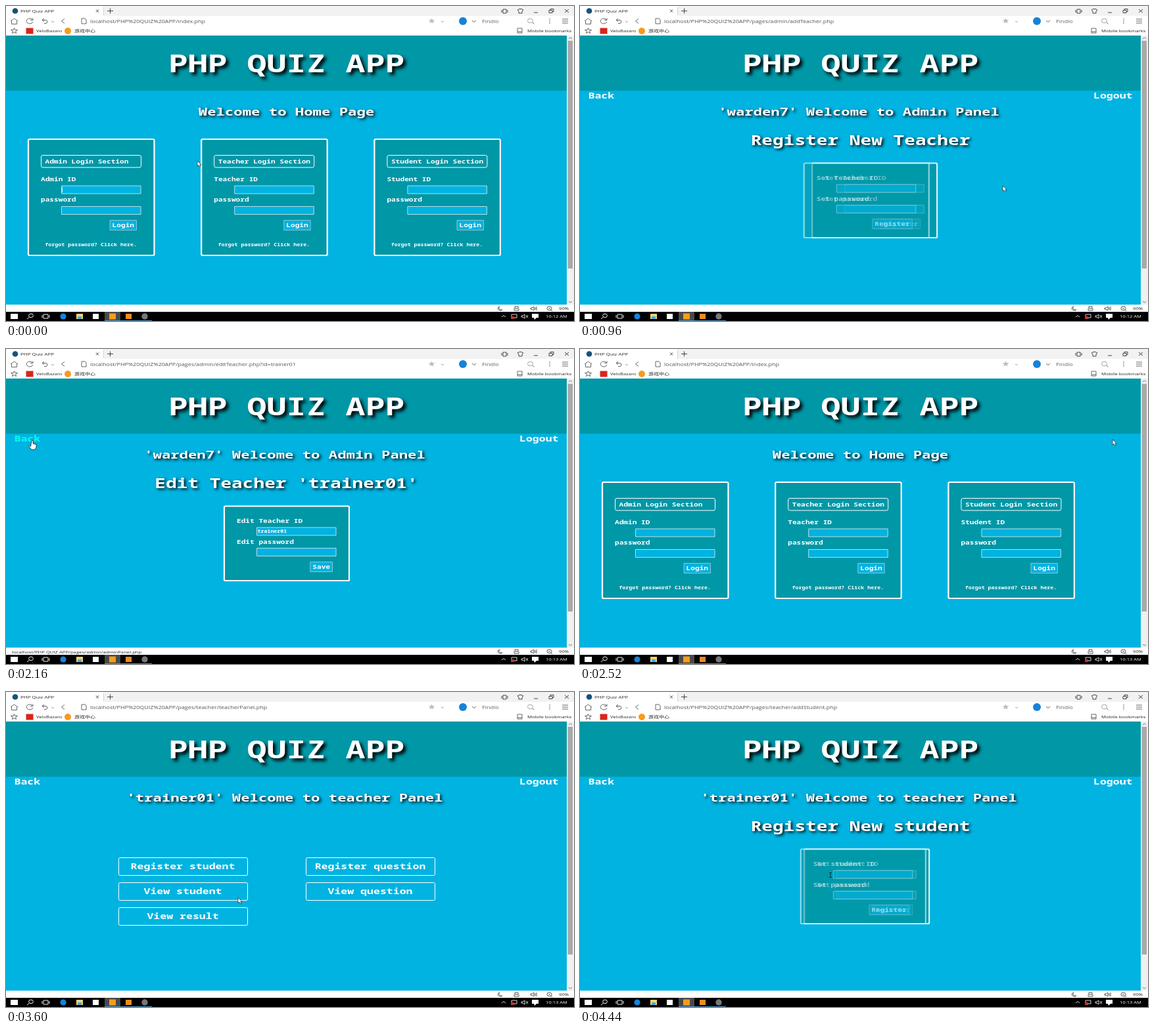
Recreate the animation shown at these times as an HTML page with a canvas. Size 864x480 px, loop 4560 ms.

```html
<!DOCTYPE html>
<html lang="en">
<head>
<meta charset="utf-8">
<title>PHP Quiz APP</title>
<style>
html, body { margin: 0; width: 100%; height: 100%; overflow: hidden; }
canvas { display: block; }
</style>
</head>
<body>
<canvas id="stage" width="864" height="480"></canvas>
<script>
const ctx = document.getElementById('stage').getContext('2d');
const LOOP = 4560, STEP = 120;
const WIDE = 1.35; // a 4:3 desktop shown on a 16:9 stage
const MONO = "'Noto Sans Mono', 'DejaVu Sans Mono', monospace";
const SANS = "'Open Sans', 'Noto Sans CJK SC', 'Noto Sans CJK', sans-serif";
const BLUE = '#00b3e1', TEAL = '#0097a7', INK = '#333', EDGE = '#b9dde4';
const ADMIN = 'warden7', TUTOR = 'trainer0', PUPIL = 'learner02';
let t = 0;

function text(s, x, y, size, { color = '#fff', weight = 'bold', align = 'left', font = MONO } = {}) {
  ctx.save();
  ctx.translate(x, y);
  ctx.scale(WIDE, 1);
  ctx.font = `${weight} ${size}px ${font}`;
  ctx.textAlign = align;
  ctx.fillStyle = color;
  ctx.fillText(s, 0, 0);
  ctx.restore();
}

const label = (s, x, y, size, color = '#222') =>
  text(s, x, y, size, { color, weight: 'normal', font: SANS });

function heading(s, y, size, x = 426.5) {
  ctx.save();
  ctx.shadowColor = '#000';
  ctx.shadowBlur = size > 30 ? 5 : 4;
  ctx.shadowOffsetX = ctx.shadowOffsetY = size > 30 ? 4 : 2.3;
  text(s, x, y, size, { align: 'center' });
  ctx.restore();
}

function rect(x, y, w, h, color) {
  ctx.fillStyle = color;
  ctx.fillRect(x, y, w, h);
}

function frame(x, y, w, h, { fill, line = '#fff', width = 1, radius = 0 } = {}) {
  ctx.beginPath();
  ctx.roundRect(x, y, w, h, radius);
  if (fill) { ctx.fillStyle = fill; ctx.fill(); }
  ctx.strokeStyle = line;
  ctx.lineWidth = width;
  ctx.stroke();
}

function disc(x, y, r, color) {
  ctx.beginPath();
  ctx.arc(x, y, r, 0, 7);
  ctx.fillStyle = color;
  ctx.fill();
}

function stroke(d, color = INK, width = .9) {
  ctx.strokeStyle = color;
  ctx.lineWidth = width;
  ctx.stroke(new Path2D(d));
}

const typed = (s, start) => s.slice(0, Math.max(0, Math.floor((t - start) / 40)));

function input(x, y, value = '') {
  frame(x + .5, y + .5, 120.5, 12, { fill: BLUE, line: EDGE });
  text(value, x + 1.5, y + 8.7, 6.15);
}

function button(s, right, y) {
  const w = s.length * 6.68 + 8;
  frame(right - w + .5, y + .5, w - 1, 15, { fill: BLUE, line: '#8fc4d0' });
  text(s, right - w / 2, y + 11, 8.25, { align: 'center' });
}

// Pages

function home() {
  heading('Welcome to Home Page', 166.5, 16.5);
  const first = t < 480;
  ['Admin', 'Teacher', 'Student'].forEach((role, i) => {
    const x = 33 + i * 263.2;
    const id = i === 0 && first ? typed(ADMIN, 0) : i === 1 && !first ? typed(TUTOR + 1, 2840) : '';
    const pass = i === 0 && first ? typed('••••••', 240) : i === 1 && !first ? typed('••••••', 3200) : '';
    frame(x + 1, 203, 191.5, 177, { fill: TEAL, width: 2.2, radius: 2 });
    frame(x + 20.5, 227.5, 152, 18.5, { radius: 2.5 });
    text(role + ' Login Section', x + 26.5, 239.7, 8.25);
    text(role + ' ID', x + 20, 267, 8.25);
    input(x + 51, 273.5, id);
    text('password', x + 20, 298.3, 8.25);
    input(x + 51, 305, pass);
    button('Login', x + 166 + (i ? 1.5 : 0), 326);
    text('forgot password? Click here.', x + 26.3, 365.5, 6.17);
  });
  if (!t) rect(85, 276, .8, 8, '#fff');
}

function panel(title, backHover) {
  text('Back', 12.5, 141.3, 12.25, { color: backHover ? '#00fff0' : '#fff' });
  text('Logout', 781, 141.3, 12.25);
  heading(title, 166.5, 16.5, 424);
}
const adminArea = hover => panel(`'${ADMIN}' Welcome to Admin Panel`, hover);
const tutorArea = () => panel(`'${TUTOR}1' Welcome to teacher Panel`);

function menu(items, columns) {
  items.forEach((s, i) => {
    const x = columns[i % columns.length], y = 252 + 38 * Math.floor(i / columns.length);
    frame(x + .5, y + .5, 196, 27, { radius: 2 });
    text(s, x + 98, y + 18, 12.25, { align: 'center' });
  });
}

function formAt(x, verb, role, action, id, pass) {
  frame(x + 1, 239.5, 190, 113.5, { fill: TEAL, width: 2.2, radius: 1.5 });
  text(`${verb} ${role} ID`, x + 20, 265.2, 8.25);
  input(x + 50, 271.5, id);
  text(verb + ' password', x + 20, 296.8, 8.25);
  input(x + 50, 303, pass);
  button(action, x + 166, 324);
}

// The form glides in from the right and leaves a blurred trace
function form(age, ...content) {
  const shift = 480 * Math.exp(-age / 30);
  const layers = shift > .5 ? [[shift * 2.4, .85], [shift, .55]] : [[0, 1]];
  for (const [dx, alpha] of layers) {
    ctx.globalAlpha = alpha;
    formAt(331 + dx, ...content);
  }
  ctx.globalAlpha = 1;
}

function table(head, ids) {
  frame(123.3, 194.3, 611, 174.2, { width: 2.4 });
  [head, 'Password', 'Actions'].forEach((title, col) => {
    const x = 128.4 + 202.2 * col, mid = x + 98;
    frame(x, 197.5, 196, 42, { width: 1.6 });
    text(title, mid, 224, 16.5, { align: 'center' });
    ids.forEach((id, row) => {
      const y = 240.3 + 20.5 * row, base = y + 12.6;
      frame(x, y, 196, 20.3, { width: 1.6 });
      if (col < 2) text(col ? 'password' : id, mid, base, 8.25, { weight: 'normal', align: 'center' });
      else {
        text('Edit', 594.5, base, 8.25);
        text('Delete', 645.5, base, 8.25);
      }
    });
  });
}

const adminPanel = {
  url: 'pages/admin/adminPanel.php',
  draw() { adminArea(); menu(['Register Teacher', 'View Teacher'], [310]); }
};
const tutorPanel = {
  url: 'pages/teacher/teacherPanel.php',
  draw() {
    tutorArea();
    menu(['Register student', 'Register question', 'View student', 'View question', 'View result'], [171, 456]);
  }
};
const homePage = { url: 'index.php', draw: home };
const backHover = () => t >= 2160;

const timeline = [
  [0, homePage],
  [480, adminPanel],
  [840, {
    url: 'pages/admin/addTeacher.php',
    draw(age) {
      adminArea();
      heading('Register New Teacher', 212, 20.6);
      form(age, 'Set', 'Teacher', 'Register', typed(TUTOR + 3, 960), typed('••••••', 1080));
    }
  }],
  [1320, adminPanel],
  [1440, {
    url: 'pages/admin/viewTeacher.php',
    draw() { adminArea(); table('Teacher ID', [1, 2, 3].map(n => TUTOR + n)); }
  }],
  [1800, {
    url: `pages/admin/editTeacher.php?id=${TUTOR}1`,
    status: () => backHover() ? 'localhost/PHP QUIZ APP/pages/admin/adminPanel.php' : '',
    draw(age) {
      adminArea(backHover());
      heading(`Edit Teacher '${TUTOR}1'`, 212, 20.6);
      form(age, 'Edit', 'Teacher', 'Save', TUTOR + 1, '');
    }
  }],
  [2280, adminPanel],
  [2520, homePage],
  [3480, tutorPanel],
  [3840, {
    url: 'pages/teacher/viewStudent.php',
    draw() { tutorArea(); table('student ID', [PUPIL]); }
  }],
  [4200, tutorPanel],
  [4295, {
    url: 'pages/teacher/addStudent.php',
    draw(age) {
      tutorArea();
      heading('Register New student', 212, 20.6);
      form(age, 'Set', 'student', 'Register', '', '');
    }
  }]
];

// Browser and desktop

function browser(url, status = '') {
  rect(0, 0, 864, 45, '#fff');
  rect(148, 0, 716, 15, '#f2f2f2');
  rect(148, 2, .8, 12, '#ccc');
  disc(14, 7.5, 4.3, '#17527c');
  label('PHP Quiz APP', 22, 10, 5.9);
  stroke('M137 5.5l4 4m0-4l-4 4M154 7.5h9m-4.500-4v8M756 5h5v6h-5zM754 6v4M763 6v4' +
    'M778 6l3-1.500h3l3 1.500-2 2v3h-5v-3zM803 10h6M826 6.500h5v4h-5zM828 6v-1.500h5v4h-2M850 5l6 5m0-5l-6 5');
  stroke('M7 23l5.500-4 5.500 4M8.500 22.500v5h8v-5M40.500 21a5 4 0 1 0 .5 3M41 18.500v3h-4' +
    'M58 19l-3 2.500 3 2.500M55 21.500h5a3 2.500 0 0 1 0 5h-2M89 19.500l-4.500 3.500 4.500 3.500' +
    'M115 19h5l2 2v6h-7zM709 22l3 2.500 3-2.500M801 25l2.500 2.500M846 20h9m-9 3h9m-9 3h9', '#555');
  stroke('M69 23l2 2 2-2M662 23l2 1.500 2-1.500', '#999');
  ctx.beginPath();
  ctx.ellipse(797.5, 22.5, 4, 3.3, 0, 0, 7);
  ctx.stroke();
  for (const y of [20, 23, 26]) disc(827, y, .8, '#555');
  const star = 'l1.300 2.800 3.700.2-2.900 2 1 3-3.100-1.700-3.100 1.700 1-3-2.900-2 3.700-.2z';
  ctx.fillStyle = '#bbb';
  ctx.fill(new Path2D('M647.500 18.500' + star));
  stroke('M12.500 33.500' + star, '#555');
  label('localhost/PHP%20QUIZ%20APP/' + url, 128, 25.7, 6.6, '#555');
  disc(695, 23, 6, '#1683d8');
  label('Findlo', 724, 25.5, 6.7, '#666');
  rect(30.5, 33.5, 11, 9, '#d8261c');
  label('VeloBazaro', 46, 40, 5.6);
  disc(94, 38, 5, '#f79a1c');
  label('游戏中心', 104, 40.2, 5.95);
  stroke('M778 34h7v7h-7zM778 39h7', '#555');
  label('Mobile bookmarks', 793, 40, 5.75);

  rect(853, 45, 11, 410, '#f0f0f0');
  rect(854.5, 53, 7.5, 347, '#a9a9a9');
  stroke('M856 50l2.500-2 2.500 2M856 450l2.500 2 2.500-2', '#666');

  rect(0, 455, 864, 11, '#fff');
  label(status, 9, 464, 5.7);
  stroke('M751 458a4 3 0 1 0 4 5a4 3 0 0 1-4-5M774 458h5v3h-5zM773 461v3h7v-3' +
    'M798 460h2l3-2v6l-3-2h-2zM805 459v4M807 458v6M829 463l2 2M825 461h3', '#444');
  ctx.beginPath();
  ctx.ellipse(826.5, 460.8, 3.6, 2.9, 0, 0, 7);
  ctx.stroke();
  label('90%', 841, 463.2, 5.7);
}

function taskbar() {
  rect(0, 466, 864, 14, '#000');
  rect(7, 469, 11, 8, '#fff');
  rect(150, 466, 24, 14, '#4a4a4a');
  rect(150, 479, 72, 1, '#4b8fbf');
  stroke('M35.500 474l-3.500 3M57 470h7v6h-7zM55 471v4M66 471v4', '#eee', 1);
  ctx.beginPath();
  ctx.ellipse(38, 471.8, 3.4, 2.8, 0, 0, 7);
  ctx.stroke();
  disc(87, 473, 4.6, '#1583dc');
  rect(107, 469, 10, 8, '#f3d36b');
  rect(109, 473, 6, 4, '#49a9dc');
  rect(132, 469, 9, 8, '#fff');
  rect(157, 468.5, 10, 9, '#f89c1c');
  rect(182, 469, 9, 8, '#f28a20');
  disc(211, 473, 4.7, '#777');
  stroke('M754 474l3-2.500 3 2.500M769 470h8v5h-8zM784 472h2l3-2v6l-3-2h-2zM791 471l3 4m0-4l-3 4', '#eee');
  rect(768, 473, 5, 4, '#d92b2b');
  rect(800, 469, 10, 6, '#fff');
  ctx.fill(new Path2D('M803 475h4l-3 3z'));
  label(t < 1320 ? '10:12 AM' : '10:13 AM', 821, 475.2, 5.6, '#fff');
}

// Pointer stops: time, x, y, shape (a arrow, h hand, i text bar)
const stops = [
  [0, 291, 236, 'a'], [240, 140, 280, 'i'], [360, 178, 333, 'h'], [480, 220, 320, 'a'],
  [720, 408, 266, 'h'], [840, 480, 270, 'a'], [960, 643, 274, 'a'], [1080, 450, 278, 'i'],
  [1200, 475, 332, 'h'], [1320, 350, 300, 'h'], [1440, 350, 298, 'a'], [1560, 350, 297, 'a'],
  [1680, 607, 249, 'h'], [1800, 607, 249, 'a'], [2160, 40, 140, 'h'], [2280, 40, 140, 'a'],
  [2400, 810, 138, 'h'], [2520, 810, 138, 'a'], [2880, 440, 280, 'i'], [3120, 466, 281, 'i'],
  [3360, 443, 333, 'h'], [3480, 400, 320, 'a'], [3720, 306, 307, 'h'], [4080, 306, 307, 'h'],
  [4200, 269, 266, 'h'], [4320, 320, 272, 'a'], [4440, 381, 279, 'i']
];

function pointer() {
  const i = Math.max(0, stops.findLastIndex(s => s[0] <= t));
  const [t0, x0, y0, shape] = stops[i], [t1, x1, y1] = stops[i + 1] || [LOOP, x0, y0];
  const k = (t - t0) / (t1 - t0), e = k * k * (3 - 2 * k);
  ctx.save();
  ctx.translate(x0 + (x1 - x0) * e, y0 + (y1 - y0) * e);
  if (shape === 'i') stroke('M-2-3.500h4M0-3.500v7M-2 3.500h4', '#123');
  else {
    if (shape === 'h') ctx.scale(1.2, 1.2);
    const outline = new Path2D(shape === 'a'
      ? 'M0 0v8l2-1.500 1.700 3 1.500-.6-1.600-3h2.700z'
      : 'M-1 0q1.200-.8 2 0v3.500l4 1v3.500l-1.500 3h-4.500l-3.500-4q1-1.500 2.500 0z');
    ctx.fillStyle = '#fff';
    ctx.fill(outline);
    ctx.strokeStyle = '#222';
    ctx.lineWidth = .7;
    ctx.stroke(outline);
  }
  ctx.restore();
}

function draw(now) {
  t = Math.floor(now % LOOP / STEP) * STEP;
  const [start, page] = timeline.findLast(entry => entry[0] <= t);
  rect(0, 0, 864, 480, BLUE);
  rect(0, 45, 853, 84, TEAL);
  heading('PHP QUIZ APP', 101, 37);
  page.draw(t - start);
  browser(page.url, page.status?.());
  taskbar();
  pointer();
  requestAnimationFrame(draw);
}
requestAnimationFrame(draw);
</script>
</body>
</html>
```
